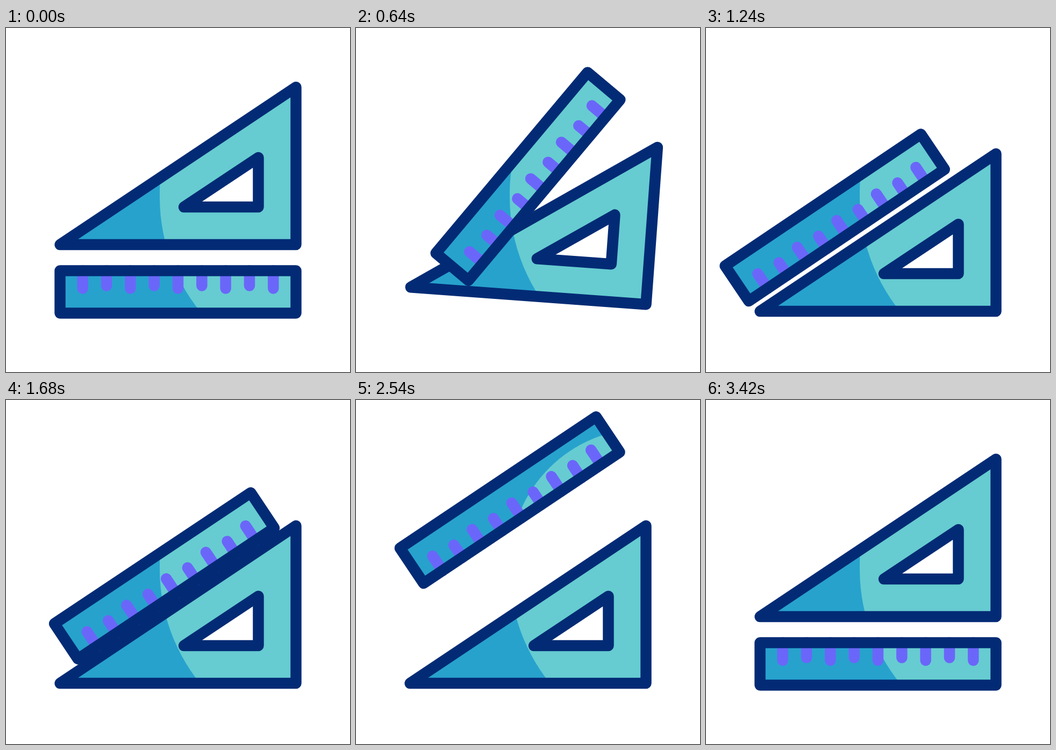
Write an HTML page with a canvas that moves like this. It is 640x640 px and loops after 3600 ms.

```html
<!DOCTYPE html>
<html lang="en">
<head>
<meta charset="utf-8">
<title>Ruler and set square</title>
<style>
  html, body { margin: 0; width: 100%; height: 100%; overflow: hidden; background: #fff; }
  canvas { display: block; width: 640px; height: 640px; }
</style>
</head>
<body>
<canvas id="stage" width="640" height="640"></canvas>
<script>
const ctx = document.getElementById('stage').getContext('2d');
const LOOP = 3600;
const LINE = 20.5;
const NAVY = '#032b75', TEAL = '#66ccd1', BLUE = '#27a2cd', PURPLE = '#6b66fa', YELLOW = '#ffcb50';
const RAD = Math.PI / 180;

// Set square legs and half size of the ruler
const BASE = 439, HEIGHT = 293;
const HALF_W = BASE / 2, HALF_H = 39.5;

// Eased progress from 0 to 1 between two times
function ease(t, from, to) {
  const s = Math.min(1, Math.max(0, (t - from) / (to - from)));
  return s * s * (3 - 2 * s);
}

const swing = (t, from, peak, to) => ease(t, from, peak) - ease(t, peak, to);

// Ruler poses
const flat = { x: 320, y: 491, turn: 0 };
const raised = { x: 320, y: 251.6, turn: 144.9 };
const low = { x: 222.8, y: 374, turn: 146.3 };
const high = { x: 419.2, y: 245.7, turn: 146.3 };
const away = { x: 282.5, y: 184.5, turn: 146.2 };

function mix(a, b, p) {
  const part = key => a[key] + (b[key] - a[key]) * p;
  return { x: part('x'), y: part('y'), turn: part('turn') };
}

function rulerPose(t) {
  if (t < 800) return mix(flat, raised, ease(t, 0, 800));
  if (t < 1400) return mix(raised, low, ease(t, 800, 1400));
  if (t < 2000) return mix(low, high, ease(t, 1460, 2000));
  if (t < 2600) return mix(high, away, ease(t, 2000, 2600));
  return mix(away, flat, ease(t, 2600, 3400));
}

function squarePose(t) {
  return {
    x: 539.5,
    y: 403 + 124 * (ease(t, 0, 800) - ease(t, 2800, 3400)),
    turn: 12 * (swing(t, 0, 400, 800) + swing(t, 2800, 3120, 3400))
  };
}

// Right triangle with its square corner at (x, y)
function triangle(x, y, width, height) {
  const path = new Path2D();
  path.moveTo(x - width, y);
  path.lineTo(x, y);
  path.lineTo(x, y - height);
  path.closePath();
  return path;
}

const square = triangle(0, 0, BASE, HEIGHT);
const hole = triangle(-70, -70, 138.5, 92);
const ruler = new Path2D();
ruler.rect(-HALF_W, -HALF_H, 2 * HALF_W, 2 * HALF_H);

// The lit area stays fixed on the stage while the tools move through it.
const light = new Path2D();
light.arc(537, 304, 251, Math.PI, 1.5 * Math.PI);
light.lineTo(700, 53);
light.lineTo(700, 653);
light.arc(624, 315, 338, Math.PI / 2, Math.PI);

function segment(x0, y0, x1, y1, color) {
  ctx.strokeStyle = color;
  ctx.beginPath();
  ctx.moveTo(x0, y0);
  ctx.lineTo(x1, y1);
  ctx.stroke();
}

function outline(path) {
  ctx.strokeStyle = NAVY;
  ctx.stroke(path);
}

function fillLit(path) {
  ctx.fillStyle = BLUE;
  ctx.fill(path);
  ctx.save();
  ctx.clip(path);
  ctx.resetTransform();
  ctx.fillStyle = TEAL;
  ctx.fill(light);
  ctx.restore();
}

function place({ x, y, turn }, draw) {
  ctx.save();
  ctx.translate(x, y);
  ctx.rotate(turn * RAD);
  draw();
  ctx.restore();
}

function drawSquare() {
  fillLit(square);
  ctx.fillStyle = '#fff';
  ctx.fill(hole);
  outline(hole);
  outline(square);
}

function drawRuler() {
  fillLit(ruler);
  for (let i = -4; i <= 4; i++) {
    const length = i % 2 ? 28 : 33;
    segment(i * 44.33, -HALF_H, i * 44.33, length - HALF_H, PURPLE);
  }
  outline(ruler);
}

// Three sparks fan out from one point, the middle one nearer to it.
function drawSparks(t) {
  const tip = 71 * ease(t, 1900, 2200);
  const tail = 71 * ease(t, 2000, 2345);
  if (tip - tail < 0.1) return;
  for (let i = -1; i <= 1; i++) {
    const angle = (237.6 + 44.3 * i) * RAD;
    const inner = i ? 45 : 36;
    const at = r => [406.8 + (inner + r) * Math.cos(angle), 190.7 + (inner + r) * Math.sin(angle)];
    segment(...at(tail), ...at(tip), YELLOW);
  }
}

function render(t) {
  ctx.fillStyle = '#fff';
  ctx.fillRect(0, 0, 640, 640);
  ctx.lineWidth = LINE;
  ctx.lineCap = ctx.lineJoin = 'round';
  place(squarePose(t), drawSquare);
  drawSparks(t);
  place(rulerPose(t), drawRuler);
}

const start = performance.now();
function tick() {
  render((performance.now() - start) % LOOP);
  requestAnimationFrame(tick);
}
tick();
</script>
</body>
</html>
```
